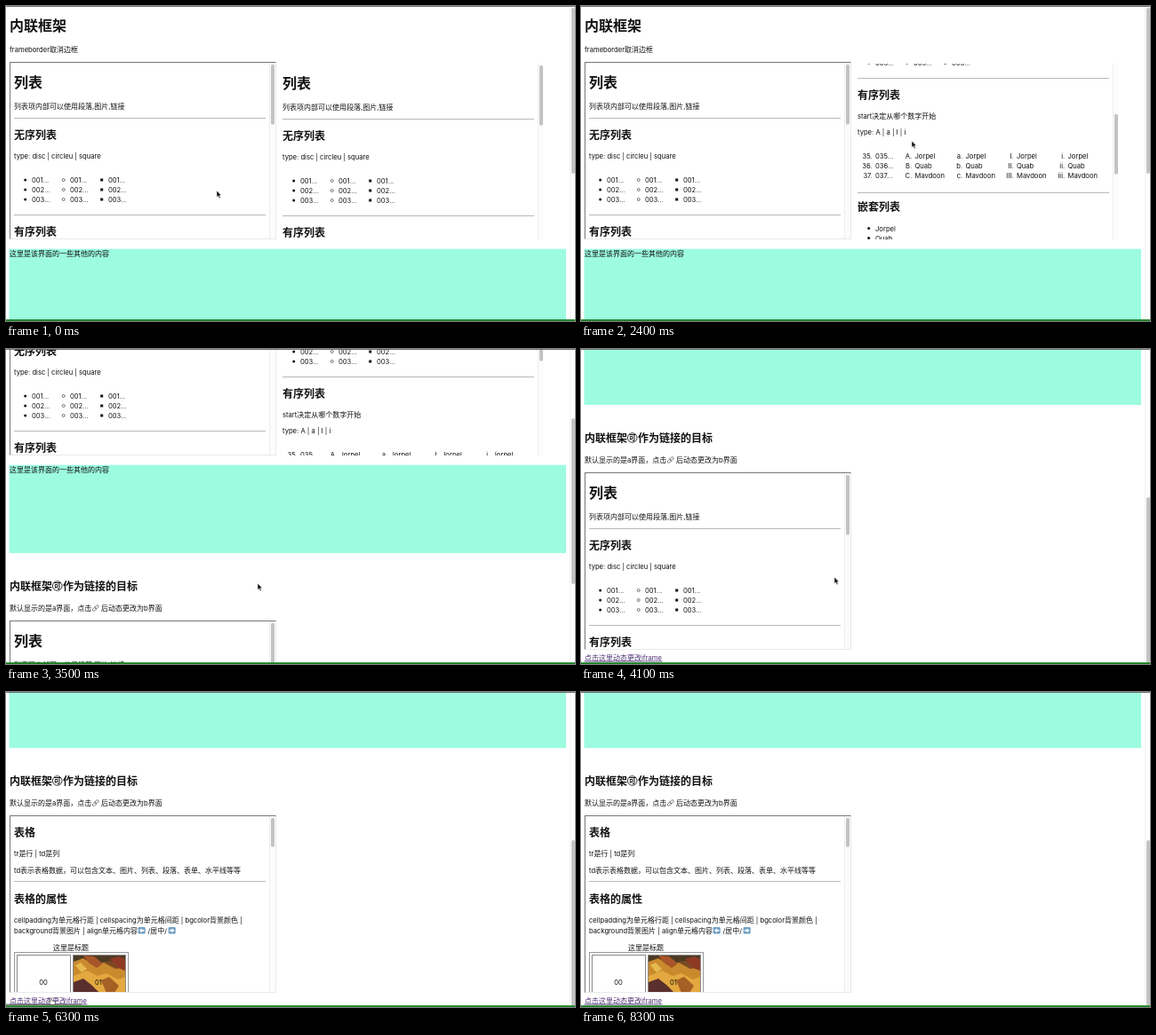
Animation of 640 by 355 pixels, one loop 8700 ms. Source, as an HTML page:

```html
<!DOCTYPE html>
<html lang="zh-CN">
<head>
<meta charset="utf-8">
<title>内联框架</title>
<style>
html, body { margin: 0; width: 100%; height: 100%; overflow: hidden; background: #fff; }
#stage { display: block; width: 100vw; height: 100vh; }
text { font-family: "Noto Sans CJK SC", "Noto Sans CJK JP", "Noto Sans CJK", sans-serif; white-space: pre; }
tspan { font-family: Inter, "Noto Sans", sans-serif; }
</style>
</head>
<body>
<svg id="stage" viewBox="0 0 640 355"></svg>
<script>
const LOOP = 8700, STEP = 100;

// Latin runs are set a little smaller than the Chinese characters around them.
function text(x, y, string, { size = 8, bold = false, fill = '#111', anchor = 'start' } = {}) {
  const runs = string.replace(/[ -~]+/g, run => `<tspan font-size="${size * 0.956}">${run}</tspan>`);
  return `<text x="${x}" y="${y}" font-size="${size}" font-weight="${bold ? 700 : 400}" fill="${fill}" text-anchor="${anchor}">${runs}</text>`;
}
const rect = (x, y, w, h, fill, extra = '') =>
  `<rect x="${x}" y="${y}" width="${w}" height="${h}" fill="${fill}" ${extra}/>`;
const shape = (d, fill, extra = '') => `<path d="${d}" fill="${fill}" ${extra}/>`;
const heading1 = (x, y, string) => text(x, y, string, { size: 16, bold: true });
const heading2 = (x, y, string) => text(x, y, string, { size: 12, bold: true });
const rule = y => rect(4, y - 0.5, 283, 1, '#b8b8b8');

function bullet(kind, x, y) {
  if (kind === 'square') return rect(x - 1.5, y - 1.5, 3, 3, '#111');
  return kind === 'disc'
    ? `<circle cx="${x}" cy="${y}" r="1.5" fill="#111"/>`
    : `<circle cx="${x}" cy="${y}" r="1.5" fill="none" stroke="#222" stroke-width=".6"/>`;
}

const products = ['Jorpel', 'Quab', 'Mavdoon'];

function listPage() {
  const unordered = [['disc', 24], ['circle', 67], ['square', 110]].map(([kind, x]) =>
    [0, 1, 2].map(i => bullet(kind, x - 7.3, 132 + i * 11) + text(x, 135 + i * 11, `00${i + 1}...`)).join('')).join('');
  const ordered = [
    [24, ['35.', '36.', '37.'], ['035...', '036...', '037...']],
    [68.5, ['A.', 'B.', 'C.'], products],
    [125.5, ['a.', 'b.', 'c.'], products],
    [183, ['I.', 'II.', 'III.'], products],
    [240.5, ['i.', 'ii.', 'iii.'], products],
  ].map(([x, marks, items]) => items.map((item, i) =>
    text(x - 3.3, 262 + i * 11, marks[i], { anchor: 'end' }) + text(x, 262 + i * 11, item)).join('')).join('');
  const nested = products.map((item, i) =>
    bullet('disc', 16.7, 340.5 + i * 11) + text(24, 343.5 + i * 11, item)).join('');
  return heading1(4, 28, '列表') + text(4, 52, '列表项内部可以使用段落,图片,链接') + rule(62.5)
    + heading2(4, 86.3, '无序列表') + text(4, 108.3, 'type: disc | circleu | square') + unordered + rule(171.5)
    + heading2(4, 194.6, '有序列表') + text(4, 216.5, 'start决定从哪个数字开始')
    + text(4, 235, 'type: A | a | I | i') + ordered + rule(300.5)
    + heading2(4, 321.2, '嵌套列表') + nested;
}

const arrowKey = (x, y, direction) =>
  rect(x - 4, y - 3.7, 8, 7.4, '#6f9fc4', 'rx="1.2"')
  + `<path d="M-2.8 0L0 -2.5V-1H2.6V1H0V2.5Z" fill="#fff" transform="translate(${x} ${y}) scale(${direction} 1)"/>`;

const hillside = rect(71, 157, 58, 50, '#7b4a22')
  + shape('M71 157H129V170L112 163L96 166L84 161L71 168Z', '#4d3a22')
  + shape('M71 164L82 160L92 167L105 165L118 172L129 170V186L112 184L95 180L80 177L71 181Z', '#c98a2e')
  + shape('M82 157L94 158L104 166L97 171L88 165Z', '#a8552a')
  + shape('M71 180L86 174L98 180L108 177L121 184L129 181V199H71Z', '#e3a83f')
  + shape('M112 161L122 158L129 161V174L121 171Z', '#8f3a25')
  + shape('M71 187L82 183L91 190L100 199H71Z', '#5a2f2c')
  + shape('M102 185L111 181L122 191L117 199H108Z', '#a65f24')
  + shape('M73 168L79 165L86 172L80 176Z', '#e6b94f');

function tablePage() {
  return heading2(4, 22.5, '表格') + text(4, 44.8, 'tr是行 | td是列')
    + text(4, 63.7, 'td表示表格数据，可以包含文本、图片、列表、段落、表单、水平线等等') + rule(73.5)
    + heading2(4, 97.5, '表格的属性')
    + text(4, 119.7, 'cellpadding为单元格行距 | cellspacing为单元格间距 | bgcolor背景颜色 |')
    + text(4, 131.7, 'background背景图片 | align单元格内容') + arrowKey(147.7, 128.7, 1)
    + text(154.5, 131.7, '/居中/') + arrowKey(181.7, 128.7, -1)
    + text(68, 151.3, '这里是标题', { anchor: 'middle' })
    + rect(4.5, 153.5, 128, 60, '#fff', 'stroke="#999"')
    + rect(7.5, 156.5, 60, 60, '#fff', 'stroke="#888"')
    + rect(70.5, 156.5, 59, 60, '#fff', 'stroke="#888"') + hillside
    + text(37, 190.3, '00', { anchor: 'middle' }) + text(99, 190.3, '01', { anchor: 'middle' });
}

function frame(x, y, content, { id, thumbId = id + 'Thumb', thumb = 68, border = true }) {
  const edges = border
    ? rect(x - 1, y - 1, 300, 200, '#e9e9e9') + shape(`M${x - 1} ${y + 199}V${y - 1}H${x + 299}L${x + 298} ${y}H${x}V${y + 198}Z`, '#777')
    : '';
  return `<g id="${id}">${edges}<svg x="${x}" y="${y}" width="298" height="198">${rect(0, 0, 298, 198, '#fff')}
    <g id="${id}Content">${content}</g>
    ${rect(291, 0, 7, 198, '#fcfcfc')}${rect(291, 0, 0.7, 198, '#e8e8e8')}
    ${rect(293, 1.7, 4, thumb, '#c3c3c3', `id="${thumbId}" rx="2"`)}</svg></g>`;
}

const linkIcon = `<g transform="translate(100.7 435) rotate(-45)" fill="none" stroke="#666" stroke-width=".8">
  <rect x="-4.2" y="-1.4" width="4.8" height="2.8" rx="1.4"/><rect x="-.6" y="-1.4" width="4.8" height="2.8" rx="1.4"/></g>`;

const page = heading1(4, 28, '内联框架') + text(4, 52.4, 'frameborder取消边框')
  + frame(5, 64, listPage(), { id: 'bordered' })
  + frame(307, 65, listPage(), { id: 'plain', border: false })
  + rect(3.5, 273.7, 626.5, 99.3, '#9dfce0') + text(4, 282.4, '这里是该界面的一些其他的内容')
  + heading2(4, 414.5, '内联框架') + heading2(64, 414.5, '作为链接的目标')
  + '<circle cx="57.7" cy="410" r="5.3" fill="#fff" stroke="#222" stroke-width=".9"/>'
  + text(57.7, 413, '可', { anchor: 'middle', bold: true })
  + text(4, 438, '默认显示的是a界面，点击') + linkIcon + text(107, 438, '后动态更改为b界面')
  + frame(5, 450, listPage(), { id: 'listFrame' })
  + frame(5, 450, tablePage(), { id: 'tableFrame', thumb: 33 })
  + text(4, 660.5, '点击这里动态更改iframe', { fill: '#4d2f73' }) + rect(4, 661.6, 87.5, 0.8, '#4d2f73');

const stage = document.getElementById('stage');
stage.innerHTML = rect(0, 0, 640, 355, '#fff') + `<g id="page">${page}</g>`
  + rect(634, 0, 6, 355, '#fcfcfc') + rect(634, 0, 0.7, 355, '#ececec')
  + rect(636, 2, 4, 187, '#c3c3c3', 'id="pageThumb" rx="2"')
  + rect(0, 0, 640, 0.9, '#666')
  + rect(0, 353.2, 640, 1.8, '#15801f')
  + rect(0, 351.6, 85, 1.6, '#777', 'id="status"')
  + `<g id="pointer">
    ${shape('M0 0V7.4L1.7 5.9L2.9 8.7L4.2 8.1L3 5.4H5.2Z', '#111', 'id="arrow" stroke="#fff" stroke-width=".5"')}
    ${shape('M1.5 1Q2.5 0 3.2 1L4 4L6.5 4.4Q8 4.8 7.7 6.2L7 8.5H3L0 5.4Q0 4.4 1 4.6L2.2 5.5Z', '#fff', 'id="hand" stroke="#222" stroke-width=".6"')}</g>`;

const pageScroll = [[2800, 0], [3000, 16], [3500, 143], [3900, 308], [4000, 310]];
const frameScroll = [[1500, 0], [1800, 175], [2100, 175], [2400, 155], [2800, 62]];
const pointerPath = [
  [0, 237, 208], [100, 296, 225], [200, 230, 272], [300, 80, 268], [400, 9, 170], [500, 50, 45],
  [600, 180, 26], [700, 290, 110], [900, 290, 110], [1000, 220, 128], [1100, 147, 147],
  [1300, 9, 235], [1400, 150, 240], [1500, 330, 200], [1600, 372, 152], [2800, 372, 152],
  [3000, 290, 270], [3100, 283, 264], [3500, 283, 264], [4100, 285, 257], [4400, 285, 257],
  [4800, 155, 251], [5300, 28, 343], [5700, 47, 344], [7900, 50, 344], [8000, 75, 333], [8200, 298, 185],
];

function valueAt(keys, t) {
  const next = keys.findIndex(key => key[0] > t);
  if (next === 0) return keys[0].slice(1);
  if (next < 0) return keys[keys.length - 1].slice(1);
  const from = keys[next - 1], to = keys[next];
  const k = (t - from[0]) / (to[0] - from[0]);
  return from.slice(1).map((value, i) => value + (to[i + 1] - value) * k);
}

const get = id => document.getElementById(id);
const show = (id, visible) => get(id).setAttribute('display', visible ? 'inline' : 'none');
const move = (id, x, y) => get(id).setAttribute('transform', `translate(${x} ${y})`);

function draw(now) {
  const t = Math.floor((now % LOOP) / STEP) * STEP;
  const [scroll] = valueAt(pageScroll, t).map(Math.round);
  const [inner] = valueAt(frameScroll, t).map(Math.round);
  const [x, y] = valueAt(pointerPath, t);
  const overLink = y > 340;
  move('page', 0, -scroll);
  move('pageThumb', 0, scroll * 165 / 310);
  move('plainContent', 0, -inner);
  move('plainThumb', 0, inner * 55 / 155);
  move('pointer', x, y);
  show('listFrame', t < 6000);
  show('tableFrame', t >= 6000);
  show('pointer', t < 8300);
  show('arrow', !overLink);
  show('hand', overLink);
  show('status', overLink);
}

const start = performance.now();
(function tick() {
  draw(performance.now() - start);
  requestAnimationFrame(tick);
})();
</script>
</body>
</html>
```
